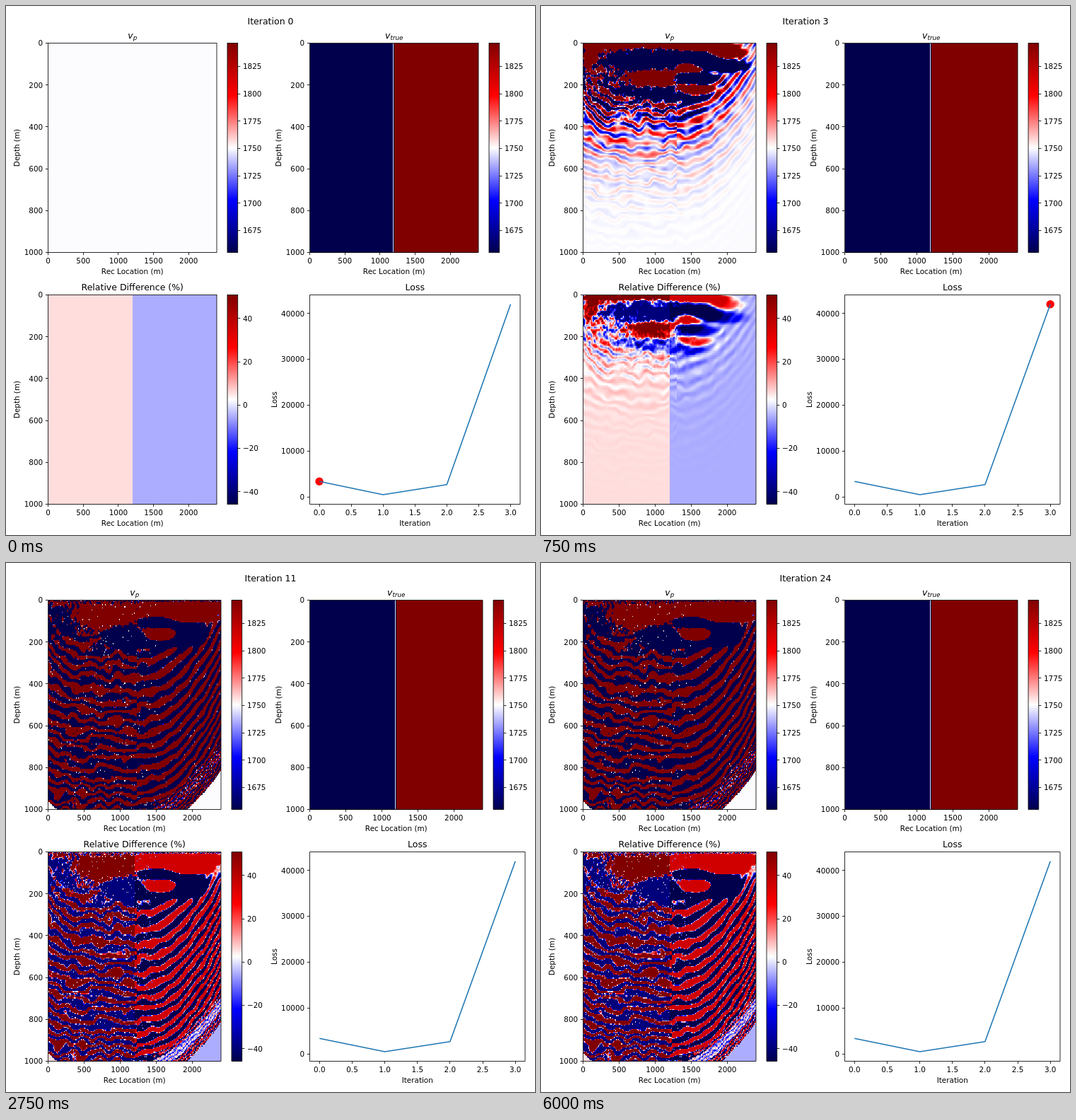
Write an HTML page with a canvas that moves like this. It is 748 px wide and 748 px high and loops after 6250 ms.

```html
<!DOCTYPE html>
<html lang="en">
<head>
<meta charset="utf-8">
<title>Velocity inversion</title>
<style>
html, body { margin: 0; width: 100%; height: 100%; overflow: hidden; background: #fff; }
canvas { display: block; }
</style>
</head>
<body>
<canvas id="stage" width="748" height="748"></canvas>
<script>
const ctx = document.getElementById('stage').getContext('2d');
const NX = 240, NZ = 200, STEP = 250, COUNT = 25;
const START = 1750, SLOW = 1655, FAST = 1846.3;
const VEL = [SLOW, FAST], DIFF = [-45.8, 50.9];
const LOSS = [3400, 500, 2700, 42000];
const SMALL = 10.42, LARGE = 12.5;

const clamp = (v, a, b) => Math.min(b, Math.max(a, v));
const ramp = (a, b, v) => clamp((v - a) / (b - a), 0, 1);

function hash(i, j) {
  const s = Math.sin(i * 127.1 + j * 311.7) * 43758.5453;
  return (s - Math.floor(s)) * 2 - 1;
}

// smooth value noise in -1..1
function noise(x, y) {
  const i = Math.floor(x), j = Math.floor(y);
  let u = x - i, v = y - j;
  u *= u * (3 - 2 * u);
  v *= v * (3 - 2 * v);
  const a = hash(i, j), b = hash(i, j + 1);
  const top = a + (hash(i + 1, j) - a) * u;
  const low = b + (hash(i + 1, j + 1) - b) * u;
  return top + (low - top) * v;
}

// blobs: centre x, centre z, radius x, radius z, strength
const BLOBS_3 = [
  [700, 8, 1100, 14, 2], [120, 60, 120, 45, 1.3], [1000, 80, 750, 48, -1.7],
  [1600, 15, 450, 18, 2], [1700, 85, 220, 38, -1.6], [1000, 162, 350, 38, 2.2],
  [1450, 112, 200, 24, 2.4], [1500, 168, 320, 28, -2], [1550, 218, 270, 22, 2],
  [900, 238, 450, 30, -1.6], [1450, 262, 270, 20, -1.8], [2000, 45, 250, 24, 1.6],
  [2030, 108, 300, 28, -2]
];
const BLOBS_4 = [
  [765, 75, 390, 58, 2], [1530, 42, 520, 34, 2.2], [1040, 175, 330, 58, -2],
  [1550, 160, 240, 28, 2.5], [1530, 104, 260, 24, -2.4], [1950, 160, 240, 58, -2.2],
  [1550, 207, 300, 20, -2], [1950, 80, 300, 24, 2], [2200, 35, 220, 25, 2],
  [200, 100, 260, 100, -0.6]
];

function blobSum(blobs, x, z) {
  let sum = 0;
  for (const [cx, cz, rx, rz, amp] of blobs) {
    const d = ((x - cx) / rx) ** 2 + ((z - cz) / rz) ** 2;
    if (d < 3) sum += amp * Math.exp(-d * d);
  }
  return sum;
}

const liftRight = x => 380 * Math.max(0, (x - 1300) / 1100) ** 2;
const liftLeft = (x, z) => 150 * Math.max(0, 1 - x / 500) ** 2 * Math.max(0, 1 - z / 1000);

// shallow update: slow body on the left, fast lens on the right
function early(x, z, drip) {
  const zz = z + 12 * noise(x / 90, z / 40);
  const k = ramp(1200, 1320, x);
  const base = x < 700 ? 240 - 130 * ((700 - x) / 700) ** 2
    : x < 1250 ? 240 - 27 * ((x - 700) / 550) ** 2
    : 213 * (1 - ((x - 1250) / 1150) ** 3);
  const below = zz - base;
  if (below > 0) {
    const band = 40 * Math.sin(below / 28) * Math.exp(-below / 70) * (1 - 2 * k);
    const grain = 30 * Math.exp(-below / 170) * noise(x / 40 + z / 60, z / 15);
    return (band + grain) * ramp(2350, 1500, x);
  }
  const rough = noise(x / 28, z / 50) + 0.7 * noise(x / 15 + 9, z / 25 + 5) + 0.4;
  const streak = 220 * noise(x / 32, z / 110) * ramp(200, 80, z);
  const left = -(110 + 150 * ramp(200, 60, z) + streak) * Math.min(1, -below / 35)
    + drip * 950 * rough * Math.max(0, 1 - z / 115);
  if (!k) return left;

  const lens = x < 1480 ? 145 - 45 * (1480 - x) / 230 : 145 * (1 - ((x - 1480) / 920) ** 2);
  const fade = ramp(2420, 1700, x);
  let right = zz < lens
    ? (150 + 45 * noise(x / 130, z / 30)) * Math.min(1, (lens - zz) / 25)
    : -150 * Math.sin(Math.PI * (zz - lens) / Math.max(1, base - lens)) * (0.25 + 0.75 * fade);
  if (z < 14 && x > 1500 && x < 1850) right = -450;
  return left * (1 - k) + right * k;
}

function third(x, z) {
  const lift = liftRight(x), left = ramp(1700, 1100, x);
  const s = z + lift * 0.8 + liftLeft(x, z) + (10 + 14 * left) * noise(x / 110, z / 55);
  const wave = Math.sin(2 * Math.PI * s / (x < 1300 ? 46 : 62)) * (0.75 + 0.6 * noise(x / 80, z / 35));
  const f = wave * ramp(90, 280, z + lift * 0.5) + blobSum(BLOBS_3, x, z)
    + left * ramp(420, 200, z) * (0.9 * noise(x / 50, z / 17) + 0.7 * noise(x / 22, z / 11));
  return clamp(f * 800 * Math.exp(-Math.max(0, z + lift - 110) / 125), -750, 750);
}

function fourth(x, z) {
  const t = (x - 1920) / 480;
  const e = 1000 - 150 * t - 40 * t * t - z;
  if (e < 0) return 0;
  const speck = hash(x / 10, z / 5);
  if (z < 10) return speck * 1100;
  if (x > 1450 && e < 140) {
    const f = Math.sin(e / 3.5 + 3 * noise(x / 60, z / 30)) + 0.9 * speck;
    return clamp(f * (e > 60 && e < 115 ? 260 : 1500), -750, 750);
  }
  const left = ramp(1500, 1100, x);
  const s = z + liftRight(x) + liftLeft(x, z) + (11 + 16 * left) * noise(x / 120, z / 50);
  const turns = s / (x < 1230 ? 68 : 105) + 5.5 * (s / 1000) ** 2;
  const f = Math.sin(2 * Math.PI * turns) * ramp(80, 250, z) + blobSum(BLOBS_4, x, z)
    + (0.12 + 0.5 * left) * noise(x / 42, z / 14)
    + left * ramp(400, 150, z) * 0.8 * noise(x / 24, z / 12);
  if (left && speck > 0.97) return speck > 0.985 ? 0 : -120;
  return clamp(f * 3500, -750, 750);
}

const FIELDS = [() => 0, (x, z) => early(x, z, 0.35), (x, z) => early(x, z, 1), third, fourth];

function seismic(t) {
  t = clamp(t, 0, 1) * 4;
  if (t < 1) return [0, 0, 76 + 179 * t];
  if (t < 2) return [255 * (t - 1), 255 * (t - 1), 255];
  if (t < 3) return [255, 255 * (3 - t), 255 * (3 - t)];
  return [255 - 127 * (t - 3), 0, 0];
}

function raster(value, [lo, hi]) {
  const c = document.createElement('canvas');
  c.width = NX;
  c.height = NZ;
  const g = c.getContext('2d'), img = g.createImageData(NX, NZ);
  for (let j = 0, p = 0; j < NZ; j++)
    for (let i = 0; i < NX; i++, p += 4)
      img.data.set([...seismic((value(i, j) - lo) / (hi - lo)), 255], p);
  g.putImageData(img, 0, 0);
  return c;
}

const trueVel = i => i < NX / 2 ? SLOW : FAST;
const stages = FIELDS.map(field => {
  const v = new Float32Array(NX * NZ);
  for (let j = 0; j < NZ; j++)
    for (let i = 0; i < NX; i++) v[j * NX + i] = START + field(i * 10, j * 5);
  return {
    vel: raster((i, j) => v[j * NX + i], VEL),
    diff: raster((i, j) => (v[j * NX + i] / trueVel(i) - 1) * 100, DIFF)
  };
});
const truth = raster(trueVel, VEL);

function text(str, x, y, size = SMALL, align = 'center', style = '') {
  ctx.font = `${style} ${size}px "DejaVu Sans", sans-serif`;
  ctx.textAlign = align;
  ctx.fillStyle = '#000';
  ctx.fillText(str, x, y);
}

function line(...pts) {
  ctx.beginPath();
  for (let i = 0; i < pts.length; i += 2) ctx.lineTo(pts[i], pts[i + 1]);
  ctx.stroke();
}

function frame(x, y, w, h) {
  ctx.strokeStyle = '#000';
  ctx.lineWidth = 0.83;
  ctx.strokeRect(x, y, w, h);
}

const snap = v => Math.floor(v) + 0.5;

function xTick(x, y, label) {
  line(snap(x), y, snap(x), y + 3.65);
  text(label, x, y + 15);
}

function yTick(x, y, label, side = -1) {
  line(x, snap(y), x + side * 3.65, snap(y));
  text(label, x + side * 7.3, y + 3.8, SMALL, side < 0 ? 'right' : 'left');
}

function yLabel(str, x, y) {
  ctx.save();
  ctx.translate(x, y);
  ctx.rotate(-Math.PI / 2);
  text(str, 0, 0);
  ctx.restore();
}

function mathTitle(sub, x, y) {
  const wide = sub.length > 1 ? 25.4 : 13;
  text('v', x - wide / 2, y, LARGE, 'left', 'italic');
  text(sub, x - wide / 2 + 7.4, y + 2, LARGE * 0.7, 'left', 'italic');
}

function colorbar(x, y, [lo, hi], ticks) {
  const g = ctx.createLinearGradient(0, y + 296, 0, y);
  ['#00004c', '#00f', '#fff', '#f00', '#800000'].forEach((c, i) => g.addColorStop(i / 4, c));
  ctx.fillStyle = g;
  ctx.fillRect(x, y, 14.7, 296);
  frame(x, y, 14.7, 296);
  for (const t of ticks)
    yTick(x + 14.7, y + 296 * (hi - t) / (hi - lo), String(t).replace('-', '\u2212'), 1);
}

function panel(img, x, y, w, range, ticks) {
  ctx.imageSmoothingEnabled = false;
  ctx.drawImage(img, x, y, w, 296);
  if (img === truth) {
    ctx.fillStyle = '#e4e0f4';
    ctx.fillRect(Math.round(x + w / 2 - 1.5), y, 1, 296);
  }
  frame(x, y, w, 296);
  for (let m = 0; m <= 2000; m += 500) xTick(x + w * m / 2400, y + 296, m);
  for (let m = 0; m <= 1000; m += 200) yTick(x, y + 296 * m / 1000, m);
  text('Rec Location (m)', x + w / 2, y + 326.3);
  yLabel('Depth (m)', x - 40.3, y + 148);
  colorbar(x + w + 15, y, range, ticks);
}

function lossPlot(x, y, w, step) {
  const px = i => x + w * (1 / 22 + i * 10 / 33);
  const py = v => y + 285.8 - v * 0.00649;
  if (step < LOSS.length) {
    ctx.fillStyle = '#f00';
    ctx.beginPath();
    ctx.arc(px(step), py(LOSS[step]), 5.7, 0, 7);
    ctx.fill();
  }
  ctx.strokeStyle = '#1f77b4';
  ctx.lineWidth = 1.56;
  ctx.lineJoin = 'round';
  line(...LOSS.flatMap((v, i) => [px(i), py(v)]));
  frame(x, y, w, 296);
  for (let i = 0; i <= 3; i += 0.5) xTick(px(i), y + 296, i.toFixed(1));
  for (let v = 0; v <= 40000; v += 10000) yTick(x, py(v), v);
  text('Loss', x + w / 2, y - 6.2, LARGE);
  text('Iteration', x + w / 2, y + 326.3);
  yLabel('Loss', x - 46.5, y + 148);
}

function draw(step) {
  const { vel, diff } = stages[Math.min(step, 4)];
  const w = step ? 244.5 : 238.5;
  const x1 = 59.5, x2 = 429.5, y1 = 52.5, y2 = 408.5;
  const velTicks = [1675, 1700, 1725, 1750, 1775, 1800, 1825];
  ctx.fillStyle = '#fff';
  ctx.fillRect(0, 0, 748, 748);
  text('Iteration ' + step, 374, 25.5, LARGE);
  panel(vel, x1, y1, w, VEL, velTicks);
  mathTitle('p', x1 + w / 2, y1 - 6.2);
  panel(truth, x2, y1, w, VEL, velTicks);
  mathTitle('true', x2 + w / 2, y1 - 6.2);
  panel(diff, x1, y2, w, DIFF, [-40, -20, 0, 20, 40]);
  text('Relative Difference (%)', x1 + w / 2, y2 - 6.2, LARGE);
  lossPlot(x2, y2, step ? 304.5 : 297.5, step);
}

let shown = -1;
function tick() {
  const step = Math.floor(performance.now() / STEP) % COUNT;
  if (step !== shown) draw(shown = step);
  requestAnimationFrame(tick);
}
tick();
</script>
</body>
</html>
```
